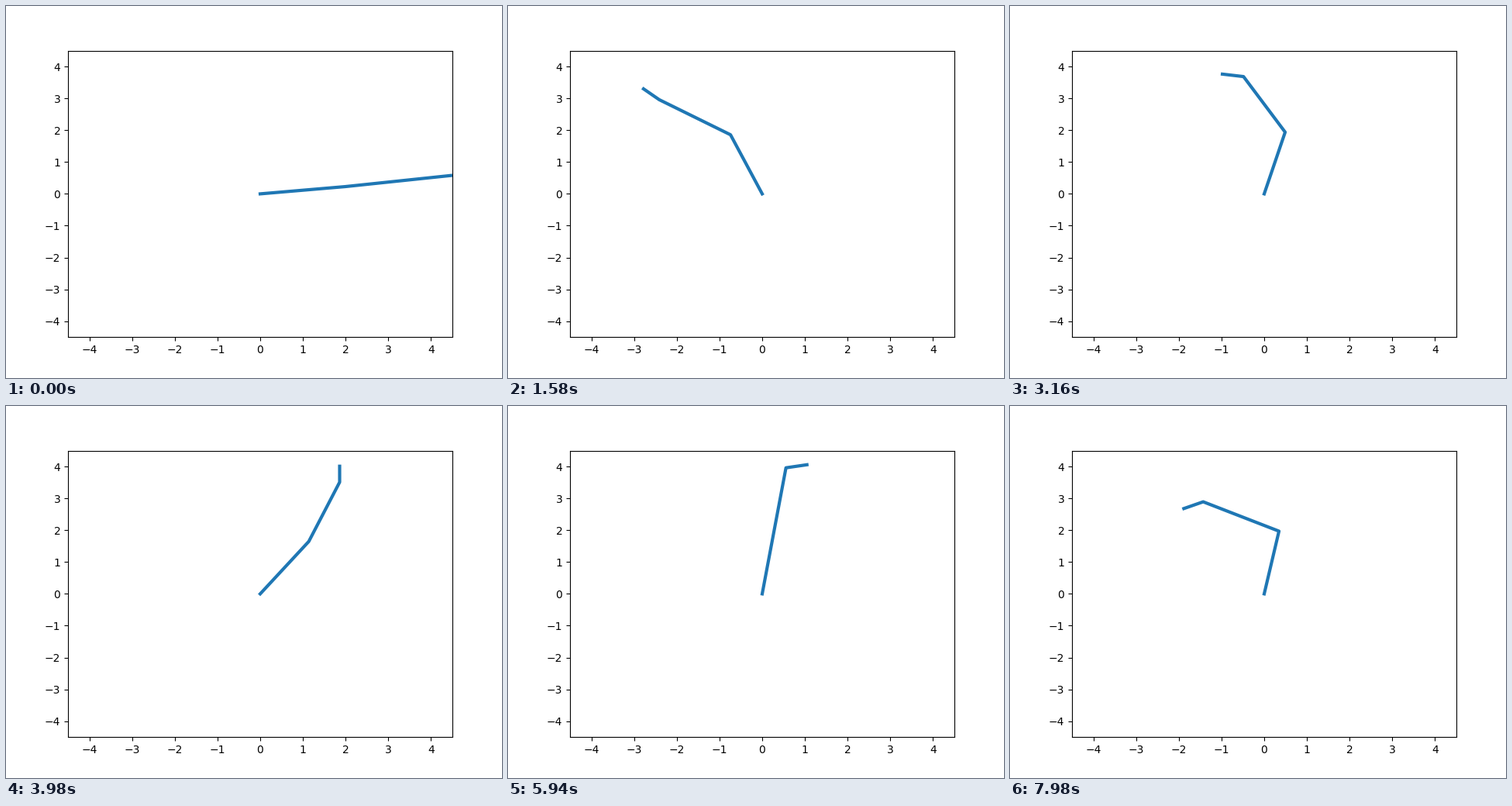
A matplotlib script that plays this animation: 640x480 px, repeating every 8 s.

```python
import numpy as np
import matplotlib.pyplot as plt
from matplotlib.animation import FuncAnimation

FRAMES = 400
STEP = 20  # ms
LENGTHS = np.array([2.0, 2.0, 0.5])

# Key poses: seconds, then shoulder, elbow and wrist in radians,
# each joint measured from the link before it
POSES = np.array([
    (0.00, .114, .026, 0),
    (0.82, 1.305, 0, -.61),
    (1.30, 1.88, .1, -.55),
    (1.58, 1.951, .607, -.163),
    (2.10, 1.72, 1.2, .6),
    (2.70, 1.46, 1.0, 1.0),
    (3.16, 1.323, .757, .907),
    (3.40, 1.21, .64, .1),
    (3.98, .966, .235, .37),
    (4.92, .55, 0, -.4),
    (5.20, .474, 0, -.56),
    (5.74, 1.2, 0, -1.2),
    (6.40, 1.82, 0, -1.02),
    (6.78, 1.869, .368, -.7),
    (7.38, 1.69, 1.2, .2),
    (7.98, 1.397, 1.265, .918),
])


def smooth(kt, kv, t):
    """Cubic Hermite curve through the values kv at the times kt."""
    slope = np.gradient(kv, kt)
    i = np.clip(np.searchsorted(kt, t, side="right") - 1, 0, len(kt) - 2)
    h = kt[i + 1] - kt[i]
    u = (t - kt[i]) / h
    return ((1 + 2 * u) * (1 - u) ** 2 * kv[i]
            + u * (1 - u) ** 2 * h * slope[i]
            + u ** 2 * (3 - 2 * u) * kv[i + 1]
            + u ** 2 * (u - 1) * h * slope[i + 1])


def chain(parts):
    return np.concatenate([[0], np.cumsum(LENGTHS * parts)])


def draw(frame):
    t = frame * STEP / 1000
    shoulder, elbow, wrist = (smooth(POSES[:, 0], v, t) for v in POSES.T[1:])
    # the elbow never bends backwards
    a = np.cumsum([shoulder, max(elbow, 0), wrist])
    arm.set_data(chain(np.cos(a)), chain(np.sin(a)))
    return arm,


fig, ax = plt.subplots(figsize=(6.4, 4.8), dpi=100)
ax.set_xlim(-4.5, 4.5)
ax.set_ylim(-4.5, 4.5)
arm, = ax.plot([], [], lw=3)

anim = FuncAnimation(fig, draw, frames=FRAMES, interval=STEP,
                     repeat=True, repeat_delay=0, blit=False)
plt.show()
```
